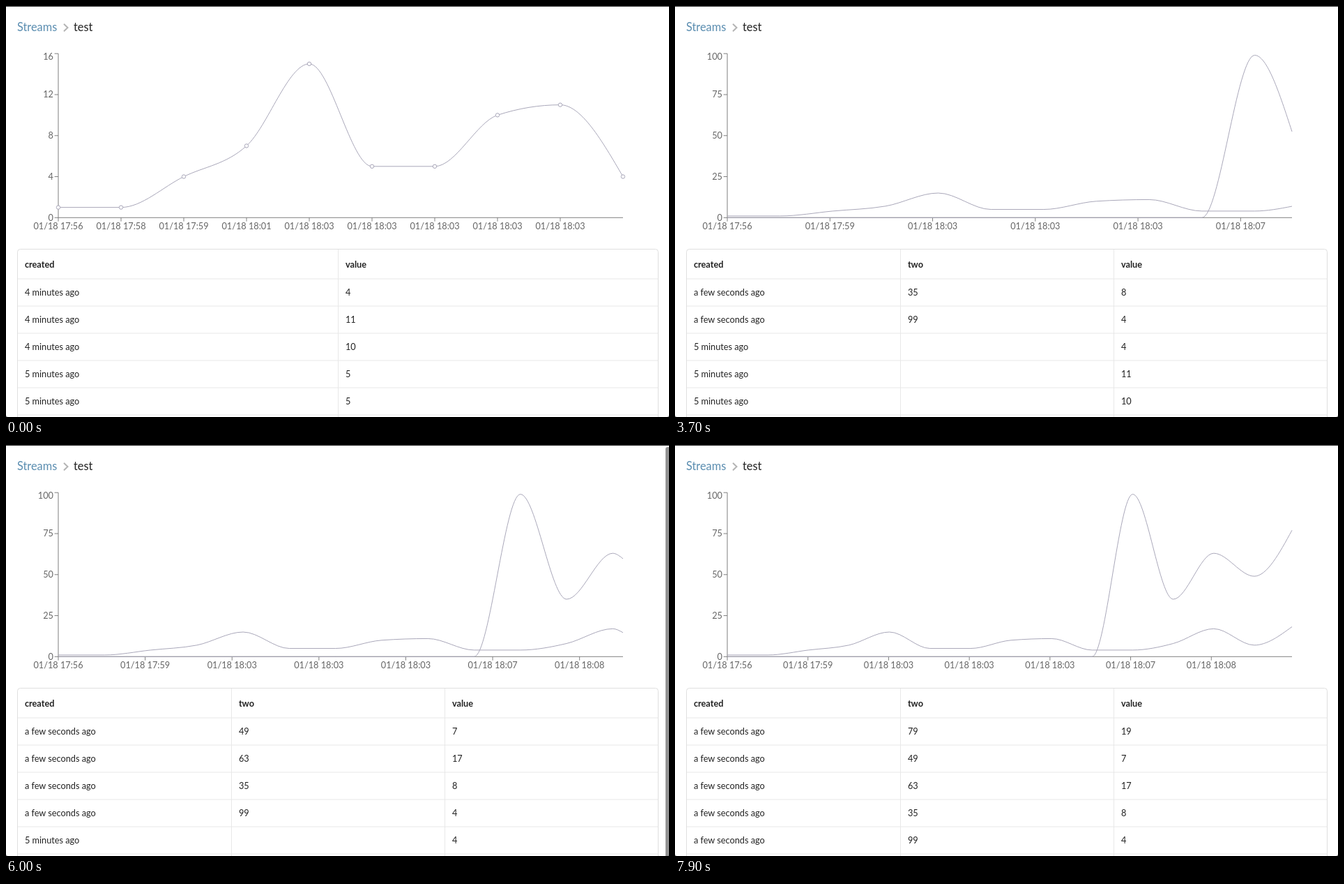
Write an HTML page that moves like this. It is 951 by 589 pixels and loops after 8 s.

```html
<!DOCTYPE html>
<html lang="en">
<head>
<meta charset="utf-8">
<title>Streams</title>
<style>
  html, body { margin: 0; width: 100%; height: 100%; overflow: hidden; background: #fff; }
  svg { display: block; width: 951px; height: 589px; font: 12.72px Lato, "Open Sans", sans-serif; }
  .axis { stroke: #7a7a7a; stroke-width: .95; fill: none; }
  .label { fill: #666; }
  .line { fill: none; stroke: #a5a3b6; stroke-width: .95; }
  .dot { fill: #fff; stroke: #a5a3b6; stroke-width: .95; }
  .cell { fill: #222; }
  .head { fill: #222; font-weight: 700; }
  .rule { stroke: #e8e8e8; fill: none; }
  .frame { stroke: #dfdfdf; fill: none; }
  .crumb { font-size: 16.35px; }
</style>
</head>
<body>
<svg viewBox="0 0 951 589">
  <text class="crumb" x="16" y="36.3" fill="#5a8db0">Streams</text>
  <path d="M83 25.7 88.5 31 83 36.3" fill="none" stroke="#b4b4b4" stroke-width="2"/>
  <text class="crumb" x="97" y="36.3" fill="#222">test</text>
  <g id="chart"></g>
  <g id="table"></g>
  <rect id="thumb" x="946" y="3" width="7" height="600" rx="3" fill="#929292"/>
  <path d="M0 .5H951" stroke="#303030"/>
  <path d="M0 586.5V589H2.5Q.4 588.6 0 586.5M951 586.5V589H948.5Q950.6 588.6 951 586.5" fill="#777"/>
</svg>
<script>
const LOOP = 8000, STEP = 100, DURATION = 1500, DELAY = 20;
const LEFT = 75, WIDTH = 810, TOP = 68.2, BOTTOM = 303.3;
const START_COUNT = 10;

// Oldest first
const values = [1, 1, 4, 7, 15, 5, 5, 10, 11, 4, 4, 8, 17, 7, 19];
const twos = [99, 35, 63, 49, 79];
const arrivals = [1590, 3030, 4185, 5720, 6850];
const clock = i => "01/18 " + (["17:56", "17:58", "17:59", "18:01"][i] || (i < 10 ? "18:03" : i < 12 ? "18:07" : "18:08"));

const byId = id => document.getElementById(id);
const text = (cls, x, y, s, anchor = "start") =>
  `<text class="${cls}" x="${x}" y="${y}" text-anchor="${anchor}">${s}</text>`;
const path = (cls, d, extra = "") => `<path class="${cls}" d="${d}" ${extra}/>`;

// cubic-bezier(.25, .1, .25, 1)
function ease(t) {
  if (t <= 0) return 0;
  if (t >= 1) return 1;
  let lo = 0, hi = 1;
  for (let i = 0; i < 30; i++) {
    const s = (lo + hi) / 2;
    if (.75 * s * (1 - s) + s ** 3 < t) lo = s; else hi = s;
  }
  return .3 * lo * (1 - lo) ** 2 + 3 * lo * lo * (1 - lo) + lo ** 3;
}

const maxFor = count => count > START_COUNT ? 100 : 16;
const toY = (v, max) => BOTTOM - v / max * (BOTTOM - TOP);
const twoAt = i => i < START_COUNT ? 0 : twos[i - START_COUNT];
const valueAt = i => values[i];

function layout(get, count) {
  return Array.from({ length: count }, (_, i) =>
    ({ x: LEFT + WIDTH * i / (count - 1), y: toY(get(i), maxFor(count)) }));
}

// The newest point grows out of the previous newest one.
function blend(get, count, p) {
  const from = layout(get, count - 1);
  return layout(get, count).map((b, i) => {
    const a = from[Math.min(i, count - 2)];
    return { x: a.x + (b.x - a.x) * p, y: a.y + (b.y - a.y) * p };
  });
}

function monotone(points) {
  const pts = points.filter((q, i) => !i || q.x - points[i - 1].x > .001);
  const last = pts.length - 1;
  const h = [], s = [];
  for (let i = 0; i < last; i++) {
    h[i] = pts[i + 1].x - pts[i].x;
    s[i] = (pts[i + 1].y - pts[i].y) / h[i];
  }
  const m = [];
  for (let i = 1; i < last; i++) {
    const mean = (s[i - 1] * h[i] + s[i] * h[i - 1]) / (h[i - 1] + h[i]);
    m[i] = (Math.sign(s[i - 1]) + Math.sign(s[i])) *
      Math.min(Math.abs(s[i - 1]), Math.abs(s[i]), Math.abs(mean) / 2);
  }
  m[0] = (3 * s[0] - m[1]) / 2;
  m[last] = (3 * s[last - 1] - m[last - 1]) / 2;
  let d = `M${pts[0].x} ${pts[0].y}`;
  for (let i = 0; i < last; i++) {
    const a = pts[i], b = pts[i + 1], k = h[i] / 3;
    d += `C${a.x + k} ${a.y + k * m[i]} ${b.x - k} ${b.y - k * m[i + 1]} ${b.x} ${b.y}`;
  }
  return d;
}

function axes(count) {
  let d = `M${LEFT} ${TOP}V${BOTTOM}H${LEFT + WIDTH}`, labels = "";
  const max = maxFor(count), every = count > 11 ? 2 : 1;
  for (let i = 0; i <= 4; i++) {
    const y = toY(max * i / 4, max);
    d += `M${LEFT - 5.4} ${y}H${LEFT}`;
    labels += text("label", 68, (i === 4 ? y + 4 : y) + 4.5, max * i / 4, "end");
  }
  for (let i = 0; i < count - 1; i += every) {
    const x = LEFT + WIDTH * i / (count - 1);
    d += `M${x} ${BOTTOM}v5.4`;
    labels += text("label", x, 319.6, clock(i), "middle");
  }
  return path("axis", d) + labels;
}

function chart(added, p) {
  const count = START_COUNT + added;
  let out = axes(count);
  if (!added) {
    const pts = layout(valueAt, count);
    return out + path("line", monotone(pts)) +
      pts.map(q => `<circle class="dot" cx="${q.x}" cy="${q.y}" r="2.7"/>`).join("");
  }
  if (added > 1) out += path("line", monotone(blend(twoAt, count, p)));
  else if (p > 0) {
    // First appearance is drawn from the newest point backwards
    out += path("line", monotone(layout(twoAt, count)),
      `pathLength="1" stroke-dasharray="0 ${1 - p} ${p} 1"`);
  }
  return out + path("line", monotone(blend(valueAt, count, p)));
}

function age(i, added) {
  if (i >= START_COUNT) return "a few seconds ago";
  return (!added && i > 6 ? 4 : 5) + " minutes ago";
}

function table(added) {
  const cols = added ? [16.5, 323.5, 629.5] : [16.5, 476.5];
  const heads = added ? ["created", "two", "value"] : ["created", "value"];
  let rules = "", out = "";
  cols.slice(1).forEach(x => rules += `M${x} 349V589`);
  heads.forEach((s, c) => out += text("head", cols[c] + 10.4, 374.6, s));
  for (let r = 0; r < 6; r++) {
    rules += `M17 ${391 + 39 * r}H935`;
    if (r === 5) break;
    const i = START_COUNT + added - 1 - r;
    const row = [age(i, added), values[i]];
    if (added) row.splice(1, 0, twoAt(i) || "");
    row.forEach((s, c) => out += text("cell", cols[c] + 10.4, 415.4 + 39 * r, s));
  }
  return path("rule", rules) +
    path("frame", "M16.5 589V352.5q0-4 4-4H931.5q4 0 4 4V589") + out;
}

function render(t) {
  const added = arrivals.filter(a => a <= t).length;
  const since = added ? t - arrivals[added - 1] : 0;
  byId("chart").innerHTML = chart(added, ease((since - DELAY) / DURATION));
  byId("table").innerHTML = table(added);
  const fade = Math.max(0, Math.min(1, (750 - since) / 250));
  byId("thumb").setAttribute("opacity", added > 2 ? fade : 0);
}

let shown = -1;
const start = performance.now();
function tick() {
  const t = Math.floor((performance.now() - start) % LOOP / STEP) * STEP;
  if (t !== shown) render(shown = t);
  requestAnimationFrame(tick);
}
tick();
</script>
</body>
</html>
```
